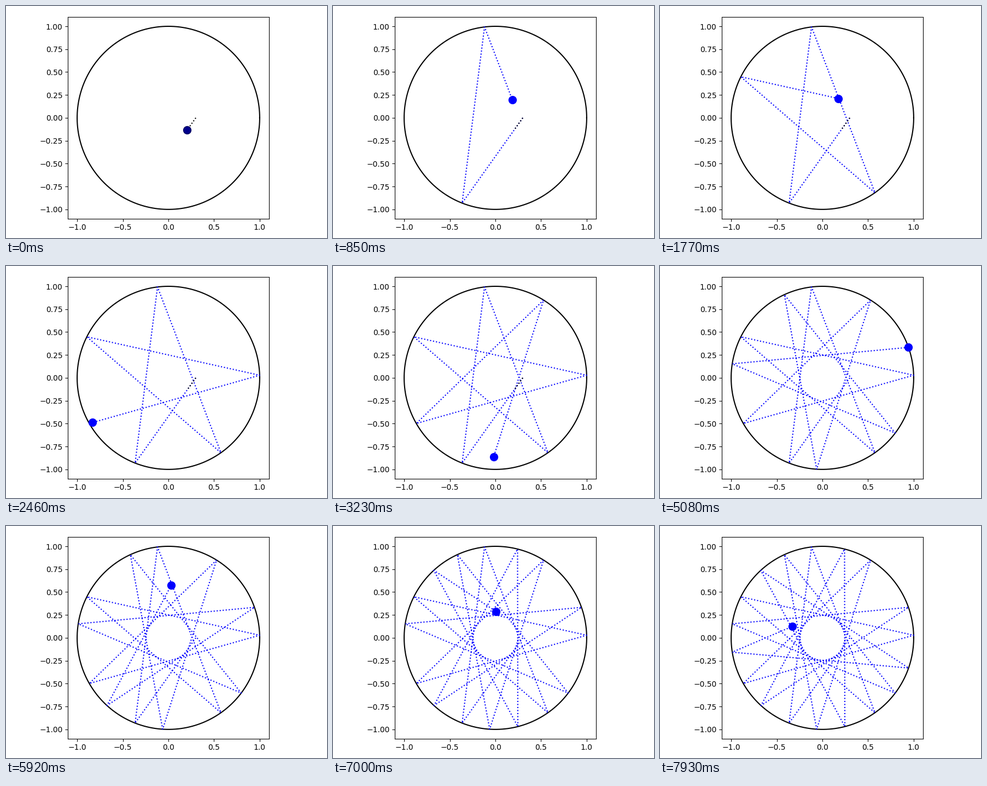
Recreate the animation shown at these times as a matplotlib script. Size 587x423 px, loop 8000 ms.

```python
import numpy as np
import matplotlib.pyplot as plt
from matplotlib.animation import FuncAnimation

W, H, DPI = 587, 423, 100
FRAMES, LOOP_MS = 104, 8000

# Billiard ball in the unit circle
START = np.array([0.3, 0.0])
DIRECTION = np.array([-0.5, -0.7]) / np.hypot(0.5, 0.7)
FIRST, STEP = 0.1625, 0.34325  # path length at the start, and per step
STUB_FRAMES = 51  # how long the first stretch of trail stays black


def bounce_points(count):
    """Return the start and the wall hits, which are evenly spaced in angle."""
    along = START @ DIRECTION
    miss = np.sqrt(START @ START - along ** 2)
    hit = START + DIRECTION * (np.sqrt(1 - miss ** 2) - along)
    turn = 2 * np.arccos(miss)
    angles = np.arctan2(hit[1], hit[0]) - turn * np.arange(count)
    return np.vstack([START, np.c_[np.cos(angles), np.sin(angles)]])


POINTS = bounce_points(20)
LENGTHS = np.r_[0, np.cumsum(np.hypot(*np.diff(POINTS, axis=0).T))]


def path_to(s):
    """Return the polyline travelled after path length s."""
    tip = [np.interp(s, LENGTHS, POINTS[:, i]) for i in (0, 1)]
    return np.vstack([POINTS[LENGTHS < s], tip])


def step_at(n):
    """Return the step shown in frame n, with two short stalls."""
    return n - (n >= 50) - (n >= 99) - (n in (47, 97))


fig = plt.figure(figsize=(W / DPI, H / DPI), dpi=DPI, facecolor="white")
cx, cy, half = 297.0, 203.93, 183.6
ax = fig.add_axes([(cx - half) / W, (H - cy - half) / H, 2 * half / W, 2 * half / H])
ax.set(xlim=(-1.1, 1.1), ylim=(-1.1, 1.1),
       xticks=np.arange(-1, 1.1, 0.5), yticks=np.arange(-1, 1.1, 0.25))

angle = np.linspace(0, 2 * np.pi, 400)
ax.plot(np.cos(angle), np.sin(angle), "k-", lw=1.5)
trail, = ax.plot([], [], ":", color="blue", lw=1.5)
stub, = ax.plot(*path_to(FIRST).T, "k:", lw=1.5)
ball, = ax.plot([], [], "o", ms=10)


def draw(n):
    path = path_to(FIRST + STEP * step_at(n))
    trail.set_data(*path.T)
    trail.set_visible(n > 0)
    stub.set_visible(n < STUB_FRAMES)
    ball.set_data(*path[-1:].T)
    ball.set_markerfacecolor("blue" if n else "#00008b")
    ball.set_markeredgecolor("blue" if n else "#000060")
    return trail, stub, ball


anim = FuncAnimation(fig, draw, frames=FRAMES, interval=LOOP_MS / FRAMES,
                     repeat=True, repeat_delay=0, blit=False)
plt.show()
```
